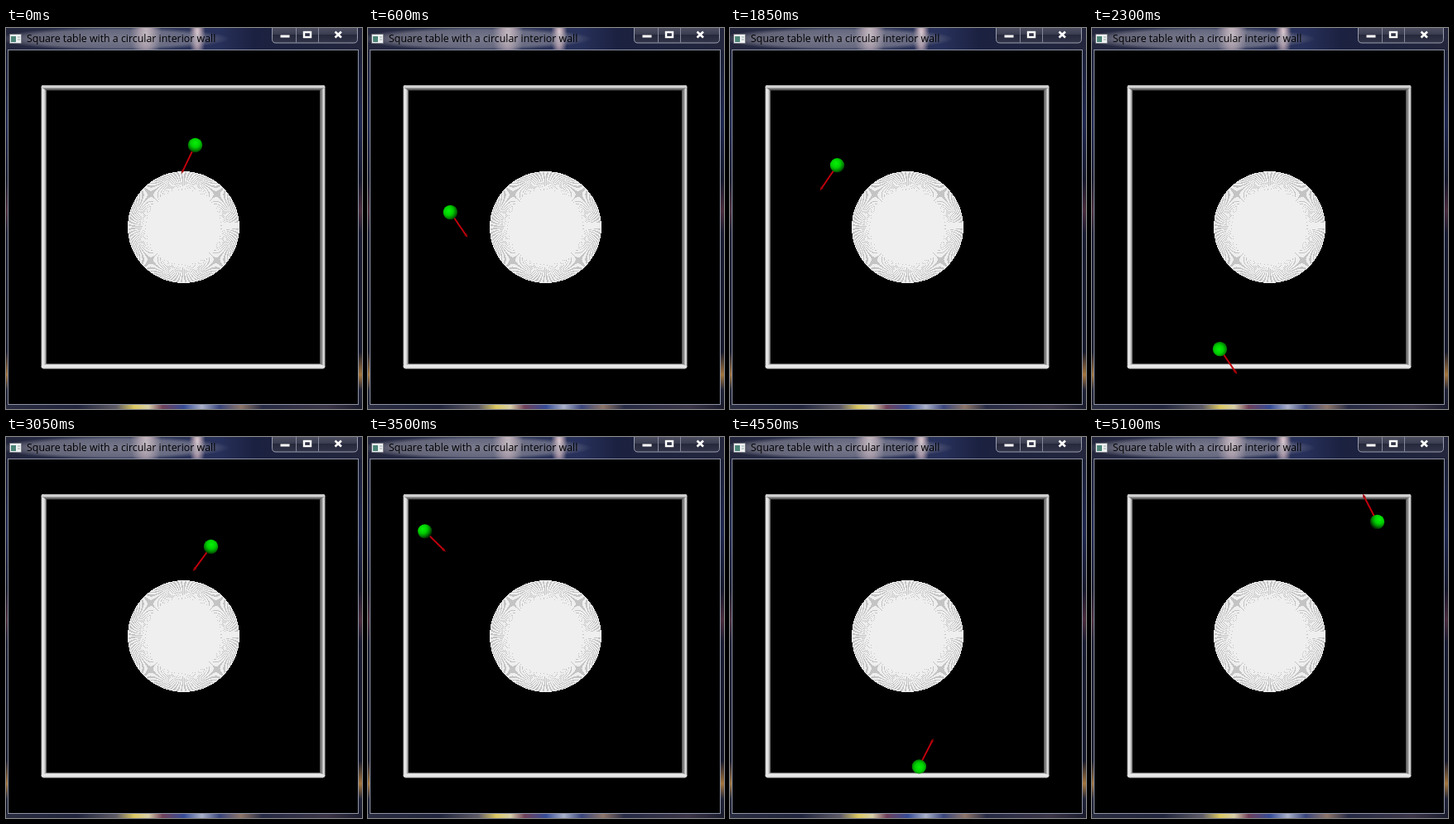
Write an HTML page that moves like this. It is 430 by 460 pixels and loops after 5150 ms.

```html
<!DOCTYPE html>
<html lang="en">
<head>
<meta charset="utf-8">
<title>Square table with a circular interior wall</title>
<style>
html, body { margin: 0; width: 100%; height: 100%; overflow: hidden; background: #12131f; }
svg { display: block; width: 430px; height: 460px; }
text { font: 12.38px "Open Sans", "Noto Sans", sans-serif; }
.crisp { shape-rendering: crispEdges; }
</style>
</head>
<body>
<svg viewBox="0 0 430 460">
  <defs>
    <linearGradient id="bar">
      <stop offset="0" stop-color="#23263c"/><stop offset=".3" stop-color="#2a3152"/>
      <stop offset=".42" stop-color="#323a5c"/><stop offset=".48" stop-color="#2b3358"/>
      <stop offset=".6" stop-color="#27305a"/><stop offset=".7" stop-color="#1b2140"/>
      <stop offset="1" stop-color="#23263c"/>
    </linearGradient>
    <linearGradient id="side" x2="0" y2="1">
      <stop offset="0" stop-color="#1a1c2e"/><stop offset=".25" stop-color="#1d2650"/>
      <stop offset=".4" stop-color="#14162a"/><stop offset=".48" stop-color="#4a2c3c"/>
      <stop offset=".54" stop-color="#171a30"/><stop offset=".85" stop-color="#15172a"/>
      <stop offset=".91" stop-color="#a5763c"/><stop offset=".95" stop-color="#202338"/>
      <stop offset="1" stop-color="#191b2c"/>
    </linearGradient>
    <linearGradient id="floor">
      <stop offset="0" stop-color="#2a2c40"/><stop offset=".2" stop-color="#20243c"/>
      <stop offset=".31" stop-color="#5d5a66"/><stop offset=".36" stop-color="#dcc860"/>
      <stop offset=".4" stop-color="#d8cfa8"/><stop offset=".44" stop-color="#70405a"/>
      <stop offset=".5" stop-color="#344a96"/><stop offset=".55" stop-color="#aab0c8"/>
      <stop offset=".6" stop-color="#38447c"/><stop offset=".66" stop-color="#8c7468"/>
      <stop offset=".72" stop-color="#262a44"/><stop offset=".9" stop-color="#3a3446"/>
      <stop offset="1" stop-color="#191b2c"/>
    </linearGradient>
    <radialGradient id="haze">
      <stop offset="0" stop-color="#a9a6b0" stop-opacity=".62"/>
      <stop offset=".75" stop-color="#a09eaa" stop-opacity=".5"/>
      <stop offset="1" stop-color="#a09eaa" stop-opacity="0"/>
    </radialGradient>
    <radialGradient id="glow">
      <stop offset="0" stop-color="#f6e4e6" stop-opacity=".95"/>
      <stop offset=".4" stop-color="#e2c4ca" stop-opacity=".7"/>
      <stop offset="1" stop-color="#c8b0bd" stop-opacity="0"/>
    </radialGradient>
    <linearGradient id="button" x2="0" y2="1">
      <stop offset="0" stop-color="#505264"/><stop offset=".45" stop-color="#3a3c50"/>
      <stop offset=".5" stop-color="#26283b"/><stop offset="1" stop-color="#32344a"/>
    </linearGradient>
    <linearGradient id="left">
      <stop offset="0" stop-color="#aaa"/><stop offset=".3" stop-color="#eee"/>
      <stop offset=".65" stop-color="#d0d0d0"/><stop offset="1" stop-color="#555"/>
    </linearGradient>
    <linearGradient id="right">
      <stop offset="0" stop-color="#555"/><stop offset=".4" stop-color="#8c8c8c"/>
      <stop offset=".7" stop-color="#ddd"/><stop offset="1" stop-color="#aaa"/>
    </linearGradient>
    <linearGradient id="top" x2="0" y2="1">
      <stop offset="0" stop-color="#aaa"/><stop offset=".35" stop-color="#e4e4e4"/>
      <stop offset=".6" stop-color="#888"/><stop offset="1" stop-color="#3c3c3c"/>
    </linearGradient>
    <linearGradient id="bottom" x2="0" y2="1">
      <stop offset="0" stop-color="#bbb"/><stop offset=".4" stop-color="#f4f4f4"/>
      <stop offset="1" stop-color="#ccc"/>
    </linearGradient>
    <radialGradient id="green" r=".68">
      <stop offset="0" stop-color="#08f008"/><stop offset=".45" stop-color="#00d000"/>
      <stop offset=".75" stop-color="#008000"/><stop offset="1" stop-color="#002800"/>
    </radialGradient>
  </defs>

  <!-- Window chrome -->
  <rect width="430" height="460" fill="url(#side)"/>
  <rect y="455" width="430" height="5" fill="url(#floor)"/>
  <rect width="430" height="27" fill="url(#bar)"/>
  <ellipse cx="169" cy="8" rx="19" ry="34" fill="url(#glow)"/>
  <ellipse cx="231" cy="8" rx="10" ry="34" fill="url(#glow)"/>
  <ellipse cx="130" cy="13" rx="140" ry="14" fill="url(#haze)"/>
  <rect x="2.5" y="26.5" width="423" height="428" fill="#000" stroke="#8d93a5"/>
  <rect x="4.500" y="7.500" width="14" height="11" fill="#eef0f0" stroke="#62656f" stroke-width=".6"/>
  <rect x="6" y="10" width="6" height="7" fill="#4c8478"/>
  <path d="M14 11h3M14 14h3" stroke="#9aa"/>
  <text x="25" y="17">Square table with a circular interior wall</text>
  <path d="M321.5 -1V13.500q0 4.500 4.500 4.500H420q4.500 0 4.500 -4.500V-1Z" fill="url(#button)" stroke="#9a9dac"/>
  <path d="M350.500 0V17.500M377.500 0V17.500" stroke="#85889a"/>
  <rect x="331.500" y="8.500" width="11" height="3" fill="#fff"/>
  <rect x="360" y="5" width="8" height="6" fill="none" stroke="#fff" stroke-width="2.400"/>
  <path d="M397.500 4.500l7.500 7M405 4.500l-7.500 7" stroke="#fff" stroke-width="2.600"/>

  <!-- Table -->
  <rect x="42.500" y="69" width="6.500" height="342" rx="2" fill="url(#left)"/>
  <rect x="379" y="69" width="6.500" height="342" rx="2" fill="url(#right)"/>
  <path d="M45 69H383l2.500 2.500-6.500 4H49l-6.500-4Z" fill="url(#top)"/>
  <path d="M49 405.500H379l6.500 3-2.500 3H45l-2.500-3Z" fill="url(#bottom)"/>
  <g class="crisp" transform="translate(214.500 240.500)">
    <circle r="67.500" fill="#efefef"/>
    <path id="gaps" fill="#c4c4c4"/>
    <rect x="47" y="-6" width="20" height="7" fill="#efefef"/>
  </g>

  <!-- Moving parts -->
  <g id="mover">
    <line id="shaft" stroke="#c4000c" stroke-width="1.900"/>
    <path id="head" d="M0 0L-5 -1.800V1.800Z" fill="#a00008"/>
    <circle r="8.700" fill="url(#green)"/>
  </g>
</svg>
<script>
const FRAME = 50, COUNT = 103;
const $ = id => document.getElementById(id);

function set(id, attrs) {
  for (const key in attrs) $(id).setAttribute(key, attrs[key]);
}

// Fine slits between the spokes of the disc; the pixel grid turns them into moire
const SPOKES = 500, step = 2 * Math.PI / SPOKES;
const polar = (r, a) => `${r * Math.cos(a)} ${r * Math.sin(a)}`;
let slits = "";
for (let i = 0; i < SPOKES; i++) {
  const a = (i + 0.5) * step, half = 0.27 * step;
  slits += `M${polar(43, a)}L${polar(67, a - half)}L${polar(67, a + half)}Z`;
}
set("gaps", { d: slits });

// [frame, x, y, passing]: bounces, plus points passed along a straight leg
const path = [
  [0, 228, 141], [1.18, 208.5, 173], [5.5, 119.5, 72], [9.02, 46, 159.5],
  [11, 88.5, 209.5, 1], [12, 99, 222, 1], [19.82, 261, 408], [25.34, 382, 269],
  [28, 323, 202, 1], [33.08, 210, 72], [41.02, 46, 261], [46, 154, 387, 1],
  [46.75, 172, 408], [55.35, 382, 166], [59.05, 301, 72], [61, 247, 132, 1],
  [62.5, 207.3, 173], [66, 120, 105, 1], [68.02, 77, 72], [69.2, 46, 96],
  [73.58, 168, 191], [77.58, 91.5, 72], [80, 46, 138], [90.6, 221, 408],
  [99.95, 382, 160], [102, 344, 102]
];

function pose(frame) {
  const end = Math.max(1, path.findIndex(p => p[0] >= frame));
  const [t0, x0, y0] = path[end - 1], [t1, x1, y1] = path[end];
  const k = (frame - t0) / (t1 - t0);
  let from = end - 1, to = end;
  while (path[from][3]) from--;
  while (path[to][3]) to++;
  const dx = path[to][1] - path[from][1], dy = path[to][2] - path[from][2];
  const len = Math.hypot(dx, dy);
  return { x: x0 + (x1 - x0) * k, y: y0 + (y1 - y0) * k, ax: 32 * dx / len, ay: 40.5 * dy / len };
}

function draw(frame) {
  const { x, y, ax, ay } = pose(frame);
  const turn = Math.atan2(ay, ax) * 180 / Math.PI;
  set("mover", { transform: `translate(${x + 0.5} ${y + 0.5})` });
  set("shaft", { x2: ax * 0.93, y2: ay * 0.93 });
  set("head", { transform: `translate(${ax} ${ay}) rotate(${turn})` });
  // The lit side faces away from the middle of the table
  set("green", { cx: 0.5 + (x - 214) / 900, cy: 0.42 + (y - 240) / 1400 });
}

function tick() {
  draw(Math.floor(performance.now() / FRAME) % COUNT);
  requestAnimationFrame(tick);
}
tick();
</script>
</body>
</html>
```
